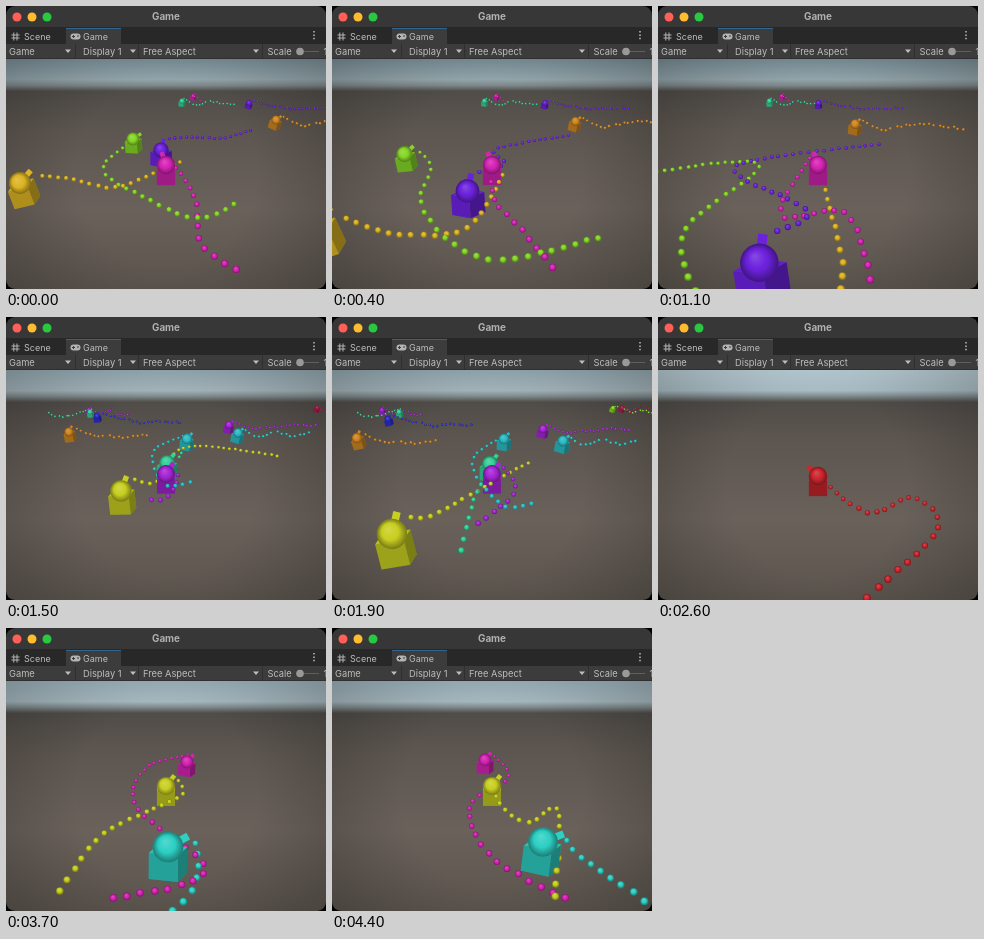
Recreate the animation shown at these times as an HTML page with a canvas. Size 320 by 283 pixels, loop 4.5 s.

```html
<!DOCTYPE html>
<html lang="en">
<head>
<meta charset="utf-8">
<title>Game</title>
<style>
  html, body { margin: 0; width: 320px; height: 283px; overflow: hidden; background: #000; }
  #window { position: relative; width: 320px; height: 283px; border-radius: 9px; overflow: hidden; }
  canvas, svg { position: absolute; left: 0; top: 0; }
  text { font: 9.3px Inter, sans-serif; fill: #bdbdbd; }
  .tab { font-size: 9px; }
  .title { font-weight: 700; font-size: 9.9px; fill: #b0b0b0; text-anchor: middle; }
</style>
</head>
<body>
<div id="window">
  <canvas id="view" width="320" height="283"></canvas>
  <svg width="320" height="53">
    <rect width="320" height="22" fill="#373737"/>
    <circle cx="11" cy="11" r="4.5" fill="#ff5f57"/>
    <circle cx="26" cy="11" r="4.5" fill="#febc2e"/>
    <circle cx="41" cy="11" r="4.5" fill="#28c840"/>
    <text class="title" x="160" y="14">Game</text>
    <rect y="21" width="320" height="17" fill="#282828"/>
    <rect x="60" y="22" width="55" height="16" fill="#3c3c3c"/>
    <rect x="60" y="22" width="55" height="1" fill="#31658f"/>
    <path d="M7.8 26.5v8M11 26.5v8M5.5 29h8M5.5 32h8" stroke="#b4b4b4"/>
    <text class="tab" x="18" y="34">Scene</text>
    <rect x="64.5" y="27.5" width="10" height="6" rx="3" fill="#b4b4b4"/>
    <path d="M66 30.5h3M67.5 29v3M71 30h2" stroke="#3c3c3c"/>
    <text class="tab" x="77" y="34">Game</text>
    <path d="M308 25v1.5M308 28.4v1.5M308 31.8v1.5" stroke="#bdbdbd" stroke-width="1.5"/>
    <rect y="38" width="320" height="15" fill="#3c3c3c"/>
    <path d="M69.5 38v15M132.5 38v15M256.5 38v15M0 52.5h320" stroke="#2f2f2f"/>
    <path d="M59 43.5h6l-3 3.5zM124 43.5h6l-3 3.5zM247 43.5h6l-3 3.5z" fill="#bdbdbd"/>
    <text x="3" y="48.5">Game</text>
    <text x="77" y="48.5">Display 1</text>
    <text x="137" y="48.5">Free Aspect</text>
    <text x="261.5" y="48.5">Scale</text>
    <path d="M291 45.5h22" stroke="#606060"/>
    <circle cx="294" cy="45.5" r="3.8" fill="#999"/>
    <text x="317.5" y="48.5">1x</text>
  </svg>
</div>
<script>
const ctx = document.getElementById('view').getContext('2d');
const LOOP = 4500, STEP = 100;

// Each shot lasts until `end`; its two key poses belong to the times `a` and `b`.
const shots = [
  { end: 1150, a: 0, b: 800, sky: ['#788d96', '#93a5ab'] },
  { end: 2300, a: 1500, b: 1900, sky: ['#93a8b1', '#a3b3b9'] },
  { end: 3400, a: 2600, b: 3300, sky: ['#b9ccd5', '#a9bcc4'] },
  { end: LOOP, a: 3700, b: 4400, sky: ['#9bb0ba', '#a6b8bf'] }
].map(shot => ({ ...shot, bots: [] }));
const [A, B, C, D] = shots;

const noise = n => {
  const v = Math.sin(n * 12.9898 + 4.1) * 43758.5453;
  return v - Math.floor(v) - .5;
};

// A pose is a row of points: the bot, then the course of the balls it has fired.
const bot = (shot, color, from, to, yaw = .4, gun = -.9, spread = .6) =>
  shot.bots.push({ color, from, to, yaw, gun, spread });

// A distant bot slides sideways with a loose, wavy row of balls.
function far(shot, color, x, y, slide, reach, rise = 0) {
  const pose = [x, y];
  for (let k = 1; k <= 4; k++) pose.push(x + reach * k / 4, y + 3 + 7 * noise(x + k));
  bot(shot, color, pose, pose.map((v, i) => v + (i % 2 ? rise : slide)), .4, -.9, 2);
}

const magenta = '#d524b4', purple = '#6c22dc', yellow = '#dcb424', green = '#86d628',
      cyan = '#2cbcc4', orange = '#cf8623', red = '#cc262e', lemon = '#c9cf22',
      teal = '#36cf96', violet = '#a626d6', aqua = '#2fd0c4', blue = '#2f2fd2', crimson = '#a82050';

bot(A, magenta, [160, 159, 187, 187, 196, 238, 236, 268], [160, 159, 140, 203, 190, 216, 220, 273], 0, -1.9);
bot(A, purple, [155, 144, 185, 131, 215, 132, 247, 124], [116, 226, 159, 185, 115, 153, 231, 134], .7, -1.3);
bot(A, yellow, [14, 177, 66, 173, 110, 181, 176, 155], [-45, 262, 60, 283, 160, 262, 170, 175], .4, -.5);
bot(A, green, [127, 133, 97, 162, 130, 187, 190, 212, 235, 195], [18, 163, 100, 160, 52, 222, 120, 295, 300, 268], .4, -.5);
far(A, teal, 176, 95, -47, 54);
far(A, magenta, 187, 90, -46, 8);
far(A, purple, 243, 97, -60, 85);
far(A, orange, 270, 114, -53, 110, 3);

bot(B, violet, [160, 157, 172, 160, 160, 181, 140, 183], [160, 157, 182, 165, 178, 182, 145, 207], 0, -1);
bot(B, teal, [161, 146, 175, 140, 176, 132, 182, 124], [158, 147, 150, 165, 138, 195, 128, 241]);
bot(B, lemon, [115, 174, 150, 165, 180, 130, 275, 139], [60, 217, 98, 199, 170, 160, 200, 144], .3, -1.1);
bot(B, cyan, [181, 122, 147, 135, 160, 168, 188, 164], [172, 122, 140, 145, 170, 188, 201, 186]);
far(B, orange, 63, 115, -38, 82, 6);
far(B, violet, 83, 93, -33, 40);
far(B, blue, 91, 99, -35, 85, 3);
far(B, teal, 84, 95, -17, -42);
far(B, violet, 223, 108, -12, 88, 4);
far(B, cyan, 232, 116, -1, 75, 8);
far(B, crimson, 311, 91, -21, 28);
far(B, green, 326, 91, -45, 40);

bot(C, red, [160, 159, 207, 195, 255, 181, 279, 214, 205, 283], [160, 159, 140, 185, 220, 197, 263, 230, 240, 300], 0, -2.4);

bot(D, lemon, [160, 158, 177, 165, 150, 180, 95, 208, 47, 273], [160, 158, 165, 172, 195, 195, 226, 182, 223, 271], 0);
bot(D, magenta, [181, 134, 140, 140, 131, 180, 200, 243, 104, 272], [153, 132, 176, 150, 138, 178, 160, 229, 241, 274]);
bot(D, aqua, [162, 219, 192, 222, 187, 260, 163, 288], [211, 214, 245, 226, 285, 254, 325, 282], .3, -.5);

// Things grow with their distance below the horizon.
const botSize = y => Math.max(1.5, (y - 70) * .103);
const ballSize = y => Math.max(.7, .7 + (y - 80) * .0165);

function gradient(g, stops) {
  stops.forEach(([at, color]) => g.addColorStop(at, color));
  return g;
}

function sphere(x, y, r, color) {
  const shade = gradient(ctx.createRadialGradient(x - r * .2, y - r * .4, 0, x, y, r),
    [[0, '#ffffff30'], [.5, '#ffffff00'], [.55, '#00000000'], [1, '#00000068']]);
  for (const fill of [color, shade]) {
    ctx.fillStyle = fill;
    ctx.beginPath();
    ctx.arc(x, y, r, 0, 7);
    ctx.fill();
  }
}

function polygon(points, color, dark) {
  for (const fill of [color, `rgba(0,0,0,${dark})`]) {
    ctx.fillStyle = fill;
    ctx.beginPath();
    points.forEach(p => ctx.lineTo(...p));
    ctx.fill();
  }
}

function drawBot(x, y, { color, yaw, gun }) {
  const s = botSize(y);
  const corner = (a, down = 0) => [Math.cos(a) * s * 1.41, s * (Math.sin(a) * .42 + down * 1.7 + .2)];
  const sides = [0, 1, 2, 3].map(k => yaw + k * Math.PI / 2);
  ctx.save();
  ctx.translate(x, y);
  ctx.rotate((x - 160) * .0025); // wide lens
  for (const n of sides) {
    if (Math.sin(n) < .02) continue;
    const l = n - Math.PI / 4, r = n + Math.PI / 4;
    polygon([corner(l), corner(r), corner(r, 1), corner(l, 1)], color, .26 + .14 * Math.cos(n));
  }
  polygon(sides.map(n => corner(n + Math.PI / 4)), color, .08);
  ctx.strokeStyle = color;
  ctx.lineWidth = s * .5;
  ctx.beginPath();
  ctx.moveTo(0, 0);
  ctx.lineTo(Math.cos(gun) * s * 1.5, Math.sin(gun) * s * 1.5);
  ctx.stroke();
  sphere(0, 0, s, color);
  ctx.restore();
}

// Catmull-Rom curve through the points, at place f of span i
function curve(points, i, f) {
  return [0, 1].map(axis => {
    const [a, b, c, d] = [-1, 0, 1, 2].map(k => points[Math.min(points.length - 1, Math.max(0, i + k))][axis]);
    return b + f / 2 * (c - a + f * (2 * a - 5 * b + 4 * c - d + f * (3 * (b - c) + d - a)));
  });
}

// Balls lie along the curve at gaps that follow their size.
function ballsAlong(points, spread) {
  const balls = [];
  let last = points[0], gap = 0;
  for (let q = 0; q < (points.length - 1) * 100; q++) {
    const [x, y] = curve(points, Math.floor(q / 100), q % 100 / 100);
    const r = ballSize(y);
    gap += Math.hypot(x - last[0], y - last[1]);
    last = [x, y];
    if (gap < r * 3.5) continue;
    gap = 0;
    const n = balls.length;
    balls.push([x + noise(n) * r * spread, y + noise(n + 99) * r * spread, r]);
  }
  return balls;
}

function backdrop([high, low]) {
  ctx.fillStyle = gradient(ctx.createLinearGradient(0, 53, 0, 283),
    [[0, high], [.09, low], [.115, '#7d888b'], [.14, '#504c48'], [.3, '#5d5650'], [.65, '#69615a'], [1, '#5c554e']]);
  ctx.fillRect(0, 53, 320, 230);
  ctx.fillStyle = gradient(ctx.createRadialGradient(160, 168, 90, 160, 168, 215), [[0, '#0000'], [1, '#0000003c']]);
  ctx.fillRect(0, 53, 320, 230);
}

function draw(t) {
  const shot = shots.find(s => t < s.end);
  const u = (t - shot.a) / (shot.b - shot.a);
  const items = [];
  for (const b of shot.bots) {
    const flat = b.from.map((v, i) => v + (b.to[i] - v) * u);
    const points = flat.flatMap((v, i) => i % 2 ? [] : [[v, flat[i + 1]]]);
    const [x, y] = points[0], s = botSize(y);
    items.push({ depth: y + s * 2, paint: () => drawBot(x, y, b) });
    points[0] = [x + Math.cos(b.gun) * s * 1.5, y + Math.sin(b.gun) * s * 1.5];
    for (const [bx, by, r] of ballsAlong(points, b.spread))
      items.push({ depth: by + r * 4, paint: () => sphere(bx, by, r, b.color) });
  }
  backdrop(shot.sky);
  items.sort((p, q) => p.depth - q.depth).forEach(item => item.paint());
}

function tick() {
  draw(Math.floor(performance.now() % LOOP / STEP) * STEP);
  requestAnimationFrame(tick);
}
tick();
</script>
</body>
</html>
```
